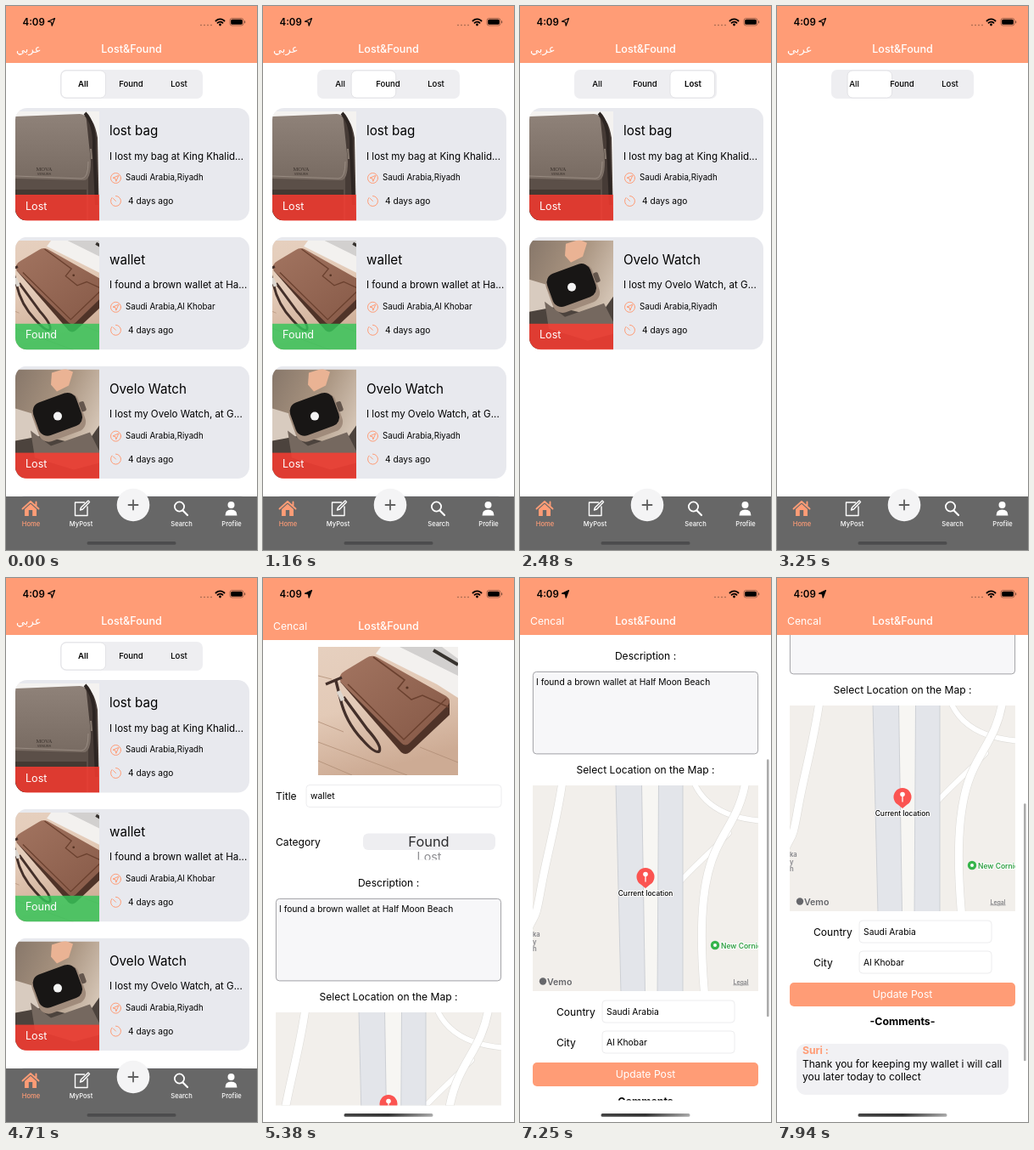
Write an HTML page that moves like this. It is 296 px wide and 640 px high and loops after 8 s.

```html
<!DOCTYPE html>
<html lang="en">
<head>
<meta charset="utf-8">
<title>Lost&amp;Found</title>
<style>
html, body { margin: 0; width: 100%; height: 100%; overflow: hidden; background: #fff; }
#stage { display: block; width: 100%; height: 100%; }
text { font-family: Inter, Roboto, sans-serif; white-space: pre; }
</style>
</head>
<body>
<svg id="stage" viewBox="0 0 296 640">
  <defs>
    <clipPath id="round"><rect x="11" width="276" height="132.5" rx="14"/></clipPath>
    <linearGradient id="wood" x2=".3" y2="1">
      <stop stop-color="#e6d0bf"/><stop offset=".5" stop-color="#e3cab7"/><stop offset="1" stop-color="#cdab94"/>
    </linearGradient>
    <linearGradient id="leather" x2="1" y2="1">
      <stop stop-color="#a27460"/><stop offset="1" stop-color="#855846"/>
    </linearGradient>
    <linearGradient id="flap" x2="0" y2="1">
      <stop stop-color="#8f8279"/><stop offset="1" stop-color="#786b62"/>
    </linearGradient>
    <linearGradient id="blur" x2="1" y2=".6">
      <stop stop-color="#87776a"/><stop offset=".5" stop-color="#a8937f"/><stop offset="1" stop-color="#d9cabb"/>
    </linearGradient>
    <linearGradient id="tube" x2="0" y2="1">
      <stop stop-color="#59595c"/><stop offset=".4" stop-color="#3d3d40"/><stop offset="1" stop-color="#252527"/>
    </linearGradient>
    <linearGradient id="bar-fade">
      <stop stop-color="#444"/><stop offset=".5" stop-color="#333"/><stop offset="1" stop-color="#aaa"/>
    </linearGradient>

    <symbol id="wallet" viewBox="0 0 165 151">
      <path fill="url(#wood)" d="M0 0h165v151H0z"/>
      <path fill="none" stroke="#b08e77" stroke-width=".8" d="M0 88l30 12M0 112l105 39M0 134l40 17M0 34l16 4M120 118l45 18"/>
      <path fill="#f3f1ef" d="M74 0h91v60L140 44 68 8z"/>
      <path fill="#d2d0cf" d="M96 0h50l19 14v20z"/>
      <path stroke="#37332f" stroke-width="4" d="M136 4l29 17"/>
      <path fill="#4f3328" d="M26 41l72 83q5 4 10 0l47-44V63z"/>
      <path fill="url(#leather)" d="M26 34q2-4 6-6l25-15q6-4 12-1l82 46q7 5 2 11l-45 44q-5 5-10 0L28 43q-4-5-2-9z"/>
      <path fill="none" stroke="#6b412f" stroke-width="1.6" d="M65 12l37 27-8 10 16 13 13-5 31 14M35 44l66 65 50-48"/>
      <circle cx="105" cy="48" r="1.6" fill="#573424"/>
      <path fill="none" stroke="#44302a" stroke-width="3.4" d="M28 36L9 44M21 40l5 20q6 28 26 49 15 17 20 14 4-6-14-26L30 59"/>
      <path stroke="#dcd6cf" stroke-width="5" d="M24 52l5 11"/>
    </symbol>

    <symbol id="bag" viewBox="0 0 99 128">
      <path fill="#f4f2f0" d="M0 0h99v128H0z"/>
      <path fill="#463b36" d="M78 5q14-3 19 26l2 97H0V50z"/>
      <path fill="#5b4f48" d="M0 72h86v56H0z"/>
      <path fill="#443932" d="M0 92h84v36H0z"/>
      <path fill="none" stroke="#2d2522" stroke-width="4" d="M82 2q12 12 11 42l3 66"/>
      <path fill="url(#flap)" d="M0 6l76-3q7 0 8 8l5 48q0 23-9 22L0 79z"/>
      <path fill="none" stroke="#a0938a" stroke-width=".8" d="M0 76l78 3q8 0 8-20"/>
      <path stroke="#877a70" stroke-width="2" d="M89 44l1 12"/>
    </symbol>

    <symbol id="watch" viewBox="0 0 99 128">
      <path fill="url(#blur)" d="M0 0h99v128H0z"/>
      <path fill="#eab394" d="M43 4l16-5 9 4-5 16-14 7-7-8z"/>
      <path fill="#d8cbbf" d="M0 46l20 6 10 26-8 14H0z"/>
      <path fill="#4c433d" d="M0 84l32-6 50 12 17-24v62H0z"/>
      <path fill="#75685f" d="M18 72l24 18 46-16 11 22v14l-30 8-46-14z"/>
      <g transform="rotate(-20 51 56)">
        <rect x="22" y="33" width="58" height="47" rx="12" fill="#a08b7b"/>
        <rect x="24" y="32" width="54" height="41" rx="11" fill="#181615"/>
        <rect x="79" y="48" width="6" height="12" rx="2" fill="#64564d"/>
      </g>
      <circle cx="50" cy="55" r="5" fill="#f4f4f4"/>
    </symbol>

    <symbol id="speaker" viewBox="0 0 99 128">
      <path fill="#fff" d="M0 0h99v128H0z"/>
      <path fill="url(#tube)" d="M0 40q45-5 85-3 14 2 14 29 0 27-14 29-45 2-85-3z"/>
      <ellipse cx="85" cy="65" rx="16" ry="28" fill="#2b2b2d"/>
      <ellipse cx="87" cy="65" rx="12" ry="23" fill="#626265" stroke="#98989b" stroke-width="1.5"/>
      <rect x="15" y="58" width="13" height="12" fill="#ec4432"/>
    </symbol>
  </defs>
  <g id="home"></g>
  <g id="detail"></g>
  <g id="system"></g>
</svg>
<script>
const $ = id => document.getElementById(id);
const ORANGE = '#ff9c76';

// Text whose capitals are centred on y
const text = (x, y, size, str, attrs = '') =>
  `<text x="${x}" y="${y + size * .36}" font-size="${size}" ${attrs}>${str}</text>`;
const rect = (x, y, w, h, fill, rx = 0, attrs = '') =>
  `<rect x="${x}" y="${y}" width="${w}" height="${h}" rx="${rx}" fill="${fill}" ${attrs}/>`;
const path = (d, attrs) => `<path d="${d}" ${attrs}/>`;
const line = (color, width) => `fill="none" stroke="${color}" stroke-width="${width}" stroke-linecap="round" stroke-linejoin="round"`;
const art = (id, x, y, w, h) =>
  `<svg x="${x}" y="${y}" width="${w}" height="${h}"><use href="#${id}" width="${w}" height="${h}"/></svg>`;
const MID = 'text-anchor="middle"';
const WHITE = 'fill="#fff"';

const items = [
  { title: 'lost bag', desc: 'I lost my bag at King Khalid...', place: 'Riyadh', ago: '4 days', kind: 2, art: 'bag' },
  { title: 'wallet', desc: 'I found a brown wallet at Ha...', place: 'Al Khobar', ago: '4 days', kind: 1, art: 'wallet' },
  { title: 'Ovelo Watch', desc: 'I lost my Ovelo Watch, at G...', place: 'Riyadh', ago: '4 days', kind: 2, art: 'watch' },
  { title: 'Bluetooth Speaker', desc: 'Black speaker, I found it in...', place: 'Abha', ago: '2 weeks', kind: 1, art: 'speaker' }
];
const tabs = ['All', 'Found', 'Lost'];

function card(c) {
  const picture = c.art === 'wallet'
    ? `<svg x="11" y="4" width="99" height="129"><use href="#wallet" x="-21" width="141" height="129"/></svg>`
    : art(c.art, 11, 4, 99, 128);
  const brand = c.art === 'bag'
    ? text(45, 72, 6.5, 'MOVA', `${MID} fill="#39302b" style="font-family:'Liberation Serif',serif"`) +
      text(45, 78, 4, 'VENURA', `${MID} fill="#39302b"`) : '';
  return `<g class="card"><g clip-path="url(#round)">
    ${rect(11, 0, 276, 133, '#e8e9ee')}${picture}${brand}
    ${rect(11, 102, 99, 31, c.kind === 1 ? '#34c759' : '#ff3b30', 0, 'opacity=".82"')}</g>
    ${text(23, 115, 12.6, tabs[c.kind], WHITE)}
    ${text(122, 26.5, 15.2, c.title)}
    ${text(122, 56.5, 11.55, c.desc)}
    <circle cx="129.5" cy="82.5" r="6" ${line(ORANGE, 1)}/>
    ${path('M132.5 79.5l-6.5 2.8 3 .7.7 3z', line(ORANGE, 1))}
    ${text(141, 81.5, 9.7, 'Saudi Arabia,' + c.place)}
    ${path('M129.5 103.5a6 6 0 1 1-4.5 2M126.5 106.5l3 3', line(ORANGE, 1))}
    ${text(144, 109.5, 10.2, c.ago + ' ago')}</g>`;
}

$('home').innerHTML = rect(0, 0, 296, 640, '#fff') + items.map(card).join('') +
  rect(0, 0, 296, 67, ORANGE) +
  text(12, 50, 13, 'عربي', WHITE + ` style="font-family:'DejaVu Sans',sans-serif"`) +
  text(148, 50.5, 12.6, 'Lost&amp;Found', MID + ' ' + WHITE + ' font-weight="500"') +
  rect(64, 75, 168, 34, '#eeeef1', 7) +
  rect(65, 76, 52.5, 32, '#fff', 6, 'id="thumb" stroke="#dadade" stroke-width=".7"') +
  tabs.map((s, i) => text(91 + 56.5 * i, 92, 9.6, s, MID + ' class="tab"')).join('') +
  rect(0, 577, 296, 63, '#676767') +
  `<circle cx="150" cy="587" r="19.3" fill="#f4f4f5"/>` +
  path('M144.5 587h11M150 581.5v11', line('#606060', 1.8)) +
  path('M19.5 591.5l9.5-8.5 9.5 8.5M35.500 583.500v4', line(ORANGE, 1.9)) +
  path('M22 592l7-6.300 7 6.300v8h-4.800v-7h-4.400v7H22z', `fill="${ORANGE}"`) +
  path('M92.5 584H81.5v15.5H96V589M87.5 593l1-3 8.5-8 1.5 1.5-8 8.5z', line('#fff', 1.4)) +
  `<circle cx="204.500" cy="589" r="5.6" ${line('#fff', 1.8)}/>` + path('M208.5 593.5l5.5 5.5', line('#fff', 2.2)) +
  `<circle cx="265.500" cy="587" r="4" fill="#fff"/>` +
  path('M258.5 599.5q0-7 7-7t7 7z', WHITE) +
  [['Home', 29.5], ['MyPost', 88.5], ['Search', 207], ['Profile', 266]].map(([s, x], i) =>
    text(x, 609, 7.6, s, `${MID} font-weight="500" fill="${i ? '#fff' : ORANGE}"`)).join('');

function map() {
  const street = (d, w) => path(d, line('#dedcd8', w + 1.2)) + path(d, line('#fff', w));
  const halo = 'stroke="#fff" stroke-width="2" paint-order="stroke" stroke-linejoin="round"';
  const highway = 'fill="#e3e5ea" stroke="#c6c9d0" stroke-width=".8"';
  const gray = 'fill="#85858a" font-weight="600"';
  return `<svg x="15" y="505" width="266" height="242" viewBox="15 0 266 242">
    ${rect(15, 0, 266, 242, '#f2efeb')}
    ${street('M50 -5C44 40 32 80 25 120S18 150 10 168', 9)}
    ${street('M204 -6C216 24 246 40 290 42', 6)}
    ${street('M188 114C208 92 226 78 246 56', 6)}
    ${street('M266 -5C260 32 244 48 231 76S209 150 218 250', 9)}
    ${path('M144 -2L148 244H163L164 -2z', 'fill="#f7f6f3"')}
    ${path('M113 -2H143.5L147.5 244H119z', highway)}
    ${path('M163.5 -2H192V244H162z', highway)}
    ${text(15, 175, 7.6, 'ka', gray)}${text(15, 184, 7.6, 'y', gray)}${text(15, 192, 7.6, 'h', gray)}
    ${path('M148 121l-5.5-4.5a10.5 10.5 0 1 1 11 0z', 'fill="#fb5451"')}
    <circle cx="148" cy="104.500" r="2.800" fill="#fff"/>
    ${path('M148 106v7', line('#fff', 1.3))}
    ${text(148, 127, 8.4, 'Current location', `${MID} ${halo} font-weight="500"`)}
    <circle cx="230" cy="188" r="5.2" fill="#35b44a"/><circle cx="230" cy="188" r="2" fill="#fff"/>
    ${text(237, 188.5, 8.5, 'New Corniche', `${halo} fill="#32a045" font-weight="600"`)}
    <circle cx="27" cy="230.500" r="4.200" fill="#66676b"/>
    ${text(32, 231, 10.6, 'Vemo', 'fill="#66676b" font-weight="600"')}
    ${text(260.5, 231, 7, 'Legal', `${MID} fill="#77787c" font-weight="500" text-decoration="underline"`)}
  </svg>`;
}

const field = (x, y, w) => rect(x, y, w, 26, '#fff', 4, 'stroke="#e7e7ea" stroke-width=".8"');

$('detail').innerHTML = rect(0, 0, 296, 640, '#fff') +
  `<svg y="67" width="296" height="547.5" viewBox="0 67 296 547.5"><g id="page">
    ${art('wallet', 65, 75, 165, 151)}
    ${text(15, 250.5, 12.1, 'Title')}${field(51, 237.5, 230)}${text(56, 250.5, 10.35, 'wallet')}
    ${text(15, 304.5, 12.1, 'Category')}
    ${rect(118, 294.5, 156, 19.5, '#eeeef1', 6)}
    ${text(195.5, 304.5, 16.4, 'Found', MID + ' fill="#2c2c2e"')}
    <svg y="316" width="296" height="9.500" viewBox="0 316 296 9.500">${text(196, 322, 14.3, 'Lost', MID + ' fill="#8e8e92"')}</svg>
    ${text(148, 353, 12.1, 'Description :', MID)}
    ${rect(15.4, 371.4, 265.2, 96.5, '#f7f7f9', 4, 'stroke="#98989c" stroke-width=".9"')}
    ${text(19, 383.5, 10.25, 'I found a brown wallet at Half Moon Beach')}
    ${text(148, 487, 12.1, 'Select Location on the Map :', MID)}
    ${map()}
    ${text(43, 771.5, 12.1, 'Country')}${field(97, 758, 156)}${text(102, 771.5, 10.35, 'Saudi Arabia')}
    ${text(43, 808, 12.1, 'City')}${field(97, 794, 156)}${text(102, 807.5, 10.35, 'Al Khobar')}
    ${rect(15, 831, 266, 28, ORANGE, 5)}${text(148, 845, 12.2, 'Update Post', MID + ' ' + WHITE)}
    ${text(148, 877, 12.3, '-Comments-', MID + ' font-weight="700"')}
    ${rect(23, 903, 250, 60, '#f1f1f4', 11)}
    ${text(30, 911, 12.2, 'Suri :', `fill="${ORANGE}" font-weight="700"`)}
    ${text(30, 926.5, 12, 'Thank you for keeping my wallet i will call')}
    ${text(30, 941.5, 12, 'you later today to collect')}
  </g></svg>` +
  rect(291, 0, 2.6, 303, '#000', 1.3, 'id="bar"') +
  rect(0, 0, 296, 67, ORANGE) +
  text(12, 50.5, 12.2, 'Cencal', WHITE) +
  text(148, 50.5, 12.6, 'Lost&amp;Found', MID + ' ' + WHITE + ' font-weight="500"');

$('system').innerHTML = text(19.5, 19, 11.5, '4:09', 'font-weight="600"') +
  path('M57.5 14.5l-8 3.7 4 .8.7 4.2z', line('#000', 1.2) + ' id="arrow"') +
  [230, 234, 238, 242].map(x => `<circle cx="${x}" cy="22.500" r=".8" fill="#8d5a45"/>`).join('') +
  path('M247.5 17.5a7 7 0 0 1 10 0M249.5 19.8a4.2 4.2 0 0 1 6 0', line('#000', 1.8)) +
  `<circle cx="252.500" cy="22" r="1.400"/>` +
  rect(264, 14.5, 16, 8.5, 'none', 2.6, 'stroke="#000" stroke-opacity=".45" stroke-width=".8"') +
  rect(265.2, 15.7, 13.6, 6.1, '#000', 1.6) + rect(281, 17.3, 1.2, 3, '#000', .6, 'opacity=".45"') +
  rect(95.5, 630, 105, 3.8, '', 1.9, 'id="grip"');

// start, tab, time the new list appears
const taps = [[1100, 1, 1500], [2200, 2, 2460], [3165, 0, 3600]];
const cards = [...document.querySelectorAll('.card')];
const labels = [...document.querySelectorAll('.tab')];
const clamp = v => Math.min(1, Math.max(0, v));

function drawList(t) {
  let thumb = 65, selected = 0, list = 0, pressed = -1, settled = true;
  for (const [start, tab, loaded] of taps) {
    if (t >= start - 90 && t < start) pressed = tab;
    if (t < start) break;
    const u = clamp((t - start) / 235);
    thumb += (65 + 56 * tab - thumb) * (1 - (1 - u) ** 4);
    selected = tab;
    settled = u === 1;
    if (t >= start + 75) list = t < loaded ? -1 : tab;
  }
  $('thumb').setAttribute('x', thumb);
  labels.forEach((el, i) => {
    el.setAttribute('font-weight', settled && i === selected ? 600 : 500);
    el.setAttribute('opacity', i === pressed ? .6 : 1);
  });
  let row = 0;
  cards.forEach((el, i) => {
    const on = list === 0 || items[i].kind === list;
    el.setAttribute('display', on ? 'inline' : 'none');
    if (on) el.setAttribute('transform', `translate(0 ${120 + 151.8 * row++})`);
  });
}

function drawDetail(t) {
  const x = Math.max(0, (t - 4820) / 83);
  const drop = Math.round(640 * (1 + x) * Math.exp(-x));
  const scroll = Math.round(355 * (1 - (1 - clamp((t - 6010) / 1930)) ** 1.29));
  const open = drop < 320;
  $('detail').setAttribute('transform', `translate(0 ${drop})`);
  $('page').setAttribute('transform', `translate(0 ${-scroll})`);
  $('bar').setAttribute('y', 69 + .553 * scroll);
  $('bar').setAttribute('opacity', .33 * clamp((t - 6010) / 150));
  $('arrow').setAttribute('fill', open ? '#000' : 'none');
  $('grip').setAttribute('fill', open ? 'url(#bar-fade)' : '#4c4c4d');
}

function frame(now) {
  const t = now % 8000;
  drawList(t);
  drawDetail(t);
  requestAnimationFrame(frame);
}
requestAnimationFrame(frame);
</script>
</body>
</html>
```
